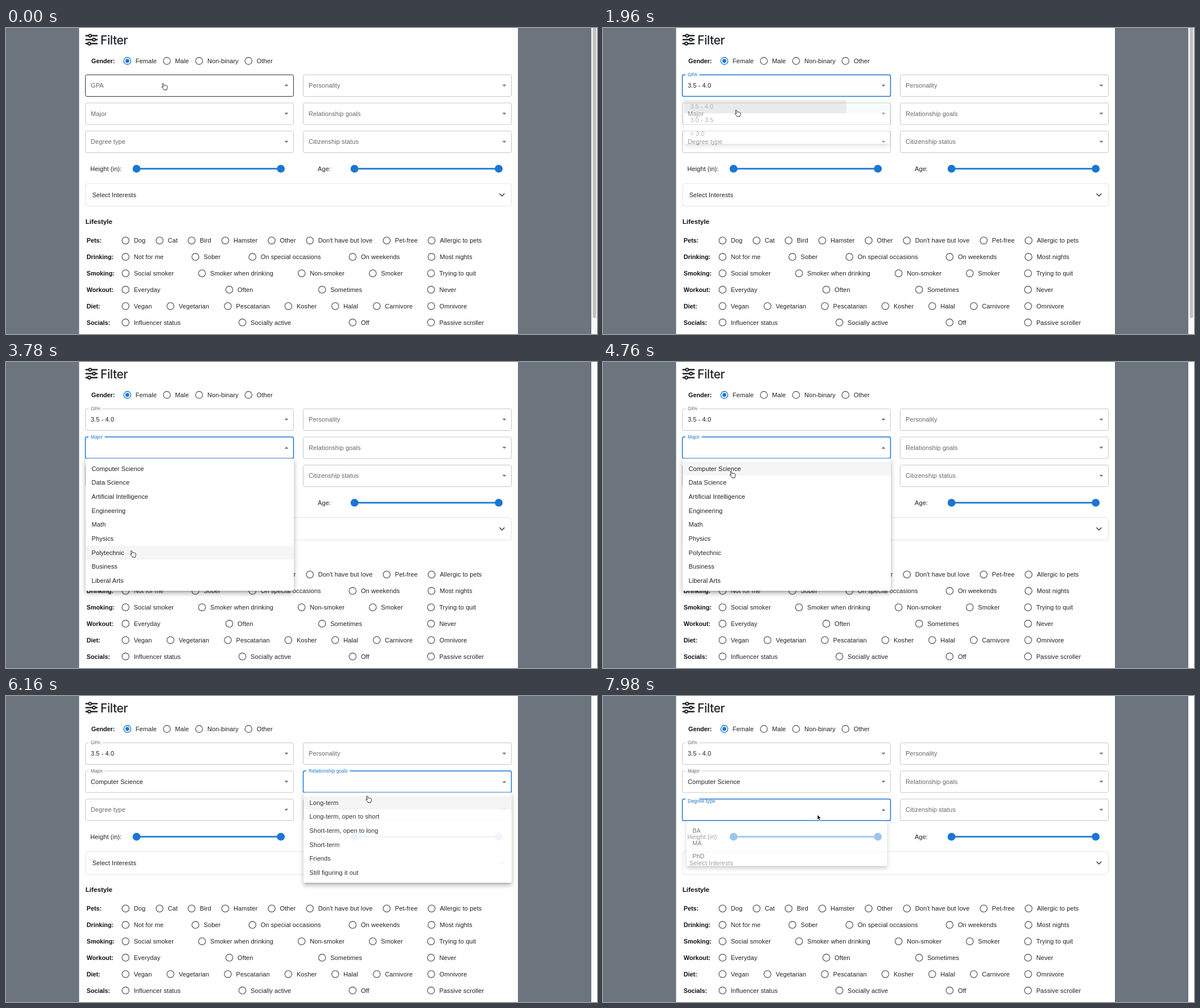
Recreate the animation shown at these times as an HTML page. Size 1039 px wide and 539 px high, loop 8 s.

```html
<!DOCTYPE html>
<html lang="en">
<head>
<meta charset="utf-8">
<title>Filter form</title>
<style>
  html, body { margin: 0; width: 100%; height: 100%; overflow: hidden; background: #fff; }
  #stage { position: relative; width: 1039px; height: 539px; overflow: hidden; }
  svg { position: absolute; left: 0; top: 0; }
  text, .menu { font: 11px "Liberation Sans", Arial, sans-serif; letter-spacing: .1px; fill: #212121; color: #212121; }
  .bold { font-weight: 700; font-size: 10.8px; letter-spacing: 0; fill: #111; }
  .head { font-size: 11.7px; }
  .title { font: 500 21px Inter, sans-serif; letter-spacing: -.45px; fill: #212529; }
  .menu {
    position: absolute; width: 366px; padding: 5.5px 0; border-radius: 2.75px;
    background: #fff; transform-origin: 50% 0;
    box-shadow: 0 3.4px 3.4px -2px rgba(0,0,0,.2), 0 5.5px 7px .7px rgba(0,0,0,.14), 0 2px 9.6px 1.4px rgba(0,0,0,.12);
  }
  .menu div { height: 24.7px; line-height: 24.7px; padding-left: 11px; }
</style>
</head>
<body>
<div id="stage">
  <svg id="page" width="1039" height="539">
    <path d="M0 0H128.5V539H0zM900 0H1029V539H900z" fill="#6c757d"/>
    <g id="bar">
      <rect x="1029" width="10" height="539" fill="#f8f8f8"/>
      <rect x="1031.5" y="-5" width="6" height="516" rx="3" fill="#c1c1c1"/>
    </g>
    <g id="icon" stroke="#212529" fill="#fff"></g>
  </svg>
  <svg id="top" width="1039" height="539">
    <g id="cursor">
      <path id="hand" fill="#fff" stroke="#111" stroke-width=".9" stroke-linejoin="round"
        d="M-1.2 .8C-1.5-.6 .4-1 .9 .3L2.2 3.6C2.6 2.7 3.9 2.7 4.2 3.5C4.7 2.9 5.8 3 6 3.9C6.7 3.4 7.6 3.9 7.6 4.8C7.8 7 7.6 8 6.9 9.4L6.7 11H1.8C1.4 9.6-.8 7.8-1.9 6.6C-2.5 5.7-1.4 4.8-.5 5.5L.5 6.2Z"/>
      <path id="arrow" fill="#000" stroke="#fff" stroke-width=".7" d="M0 0V9L2 7.2L3.5 10.6L5 10L3.5 6.7H6.3Z"/>
    </g>
  </svg>
</div>
<script>
const LOOP = 8000, STEP = 70, BLUE = '#1976d2', GREY = '#666666';
const W = 366, H = 38, ROW = 24.7, PAD = 5.5;
const $ = id => document.getElementById(id);
const page = $('page');

function add(tag, attrs, parent = page) {
  const el = document.createElementNS('http://www.w3.org/2000/svg', tag);
  set(el, attrs);
  parent.append(el);
  return el;
}
function set(el, attrs) {
  for (const k in attrs) el.setAttribute(k, attrs[k]);
}
function label(x, y, str, cls = '') {
  const el = add('text', { x, y, class: cls });
  el.textContent = str;
  return el;
}

// ---- easing ----
const clamp = v => Math.min(1, Math.max(0, v));
const mix = (a, b, p) => a + (b - a) * p;
const smooth = p => p * p * (3 - 2 * p);
// cubic-bezier(x1, 0, x2, 1)
const bezier = (x1, x2) => p => {
  p = clamp(p);
  let lo = 0, hi = 1, s = .5;
  for (let i = 0; i < 24; i++) {
    s = (lo + hi) / 2;
    const x = 3 * (1 - s) * s * ((1 - s) * x1 + s * x2) + s ** 3;
    if (x < p) lo = s; else hi = s;
  }
  return p <= 0 ? 0 : p >= 1 ? 1 : 3 * (1 - s) * s * s + s ** 3;
};
const easeInOut = bezier(.4, .2), easeOut = bezier(0, .2);

// ---- still parts ----
[[-2.5, -6.9], [4.3, 0], [-3.9, 6.9]].forEach(([dx, dy]) => {
  const y = 20.5 + dy;
  add('path', { d: `M140.7 ${y}H160`, 'stroke-width': 2.5, 'stroke-linecap': 'round' }, $('icon'));
  add('circle', { cx: 150.3 + dx, cy: y, r: 2.4, 'stroke-width': 2.06 }, $('icon'));
});
label(166, 28.5, 'Filter', 'title');

function radio(x, y, str, on) {
  const ink = on ? BLUE : '#666';
  add('circle', { cx: x, cy: y, r: 6.2, fill: 'none', stroke: ink, 'stroke-width': 1.37 });
  if (on) add('circle', { cx: x, cy: y, r: 3.4, fill: BLUE });
  label(x + 14.5, y + 4, str);
}
function radioRow(x, y, str, checked) {
  const [name, ...options] = str.split('|');
  label(x, y + 4, name, 'bold');
  options.forEach((o, i) => {
    const gap = o.indexOf(' ');
    radio(+o.slice(0, gap), y, o.slice(gap + 1), i === checked);
  });
}
radioRow(150, 58, 'Gender:|213.3 Female|282.8 Male|339.5 Non-binary|426.3 Other', 0);
label(139.7, 345, 'Lifestyle', 'bold head');
[
  "Pets:|210.2 Dog|270 Cat|326.3 Bird|385.5 Hamster|467 Other|534.2 Don't have but love|669.3 Pet-free|748.2 Allergic to pets",
  'Drinking:|210.2 Not for me|333 Sober|433.2 On special occasions|609.4 On weekends|748 Most nights',
  'Smoking:|210.2 Social smoker|344.6 Smoker when drinking|519.7 Non-smoker|644.8 Smoker|747.2 Trying to quit',
  'Workout:|210.2 Everyday|392.6 Often|555.7 Sometimes|747.2 Never',
  'Diet:|210.2 Vegan|289.2 Vegetarian|390 Pescatarian|496.4 Kosher|578.8 Halal|651.8 Carnivore|747.5 Omnivore',
  'Socials:|210.2 Influencer status|415.6 Socially active|609.4 Off|747.2 Passive scroller'
].forEach((row, i) => radioRow(141.7, 374.3 + i * 28.88, row));

function slider(x, name, from, to) {
  label(x, 251.8, name);
  add('path', { d: `M${from} 247.9H${to}`, stroke: BLUE, 'stroke-width': 2.75 });
  for (const cx of [from, to]) add('circle', { cx, cy: 247.9, r: 6.9, fill: BLUE });
}
slider(148.3, 'Height (in):', 229.5, 483.2);
slider(548, 'Age:', 612.7, 866.2);

add('rect', { x: 140, y: 274.2, width: 748.5, height: 39.8, rx: 4, fill: 'none', stroke: '#dee2e6' });
label(151.7, 298, 'Select Interests');
add('path', { d: 'M868 292L872 296L876 292', fill: 'none', stroke: '#212529', 'stroke-width': 1.3, 'stroke-linecap': 'round', 'stroke-linejoin': 'round' });

// ---- select fields ----
function field(col, row, name, opts = {}) {
  const x = 139.5 + col * 383, y = 82.5 + row * 49.5;
  const f = { x, y, focus: Infinity, blur: Infinity, pick: Infinity, ...opts };
  f.box = add('rect', { x, y, width: W, height: H, rx: 2.75, fill: 'none' });
  f.notch = add('rect', { x: x + 5.5, y: y - 1.2, height: 2.4, fill: '#fff' });
  f.name = label(0, 0, name);
  f.len = f.name.getComputedTextLength() * .75 + 7.5;
  f.text = label(x + 9.4, y + 22.6, f.value || '');
  f.tri = add('path', { d: 'M-3.5-1.7H3.5L0 1.8Z', fill: '#757575' });
  return f;
}
const gpa = field(0, 0, 'GPA', { focus: 300, blur: 2420, pick: 1853, value: '3.5 - 4.0' });
const major = field(0, 1, 'Major', { focus: 2420, blur: 5960, pick: 5160, value: 'Computer Science' });
const degree = field(0, 2, 'Degree type', { focus: 7884 });
const goals = field(1, 1, 'Relationship goals', { focus: 5960, blur: 7140 });
const fields = [gpa, major, degree, goals, field(1, 0, 'Personality'), field(1, 2, 'Citizenship status')];

function drawField(f, t, hover, open) {
  const focused = t >= f.focus && t <= f.blur;
  const filled = t >= f.pick;
  const back = filled ? 0 : easeOut((t - f.blur) / 200);
  const up = easeOut((t - f.focus) / 200) * (1 - back);
  const gap = clamp((t - f.focus - 50) / 100) * (filled ? 1 : 1 - clamp((t - f.blur + 14) / 50));
  const blue = 100 * easeOut((t - f.focus) / 200) * (1 - easeOut((t - f.blur) / 200));

  set(f.box, { stroke: focused ? BLUE : hover ? '#333' : '#c6c6c6', 'stroke-width': focused ? 1.5 : 1 });
  f.notch.setAttribute('width', f.len * gap);
  f.name.setAttribute('transform', `translate(${f.x + 9.5} ${f.y + mix(22.5, 2.6, up)}) scale(${mix(1, .75, up)})`);
  f.name.style.fill = `color-mix(in srgb, ${BLUE} ${blue}%, ${GREY})`;
  f.text.style.opacity = filled ? 1 : 0;
  f.tri.setAttribute('transform', `translate(${f.x + 353.5} ${f.y + 19}) rotate(${open ? 180 : 0})`);
}

// ---- menus ----
function menu(f, close, items, press = Infinity) {
  const el = document.createElement('div');
  el.className = 'menu';
  el.style.left = f.x + 'px';
  el.style.top = f.y + H + 'px';
  for (const item of items.split('|')) {
    const row = document.createElement('div');
    row.textContent = item;
    el.append(row);
  }
  $('stage').insertBefore(el, $('top'));
  const n = el.children.length, k = (n * 36 + 16) / 36;
  return { f, el, n, open: f.focus, close, press, dur: (4 + 15 * k ** .25 + k / 5) * 10 };
}
const menus = [
  menu(gpa, 1853, '3.5 - 4.0|3.0 - 3.5|< 3.0', 1730),
  menu(major, 5160, 'Computer Science|Data Science|Artificial Intelligence|Engineering|Math|Physics|Polytechnic|Business|Liberal Arts', 5040),
  menu(goals, 7100, 'Long-term|Long-term, open to short|Short-term, open to long|Short-term|Friends|Still figuring it out'),
  menu(degree, Infinity, 'BA|MA|PhD')
];

function drawMenu(m, t, x, y) {
  const { el, dur } = m;
  const shown = t >= m.open && t < m.close + dur;
  el.style.display = shown ? '' : 'none';
  if (!shown) return;
  const closing = t >= m.close, age = t - (closing ? m.close : m.open);
  const fade = easeInOut(age / dur);
  const grow = easeInOut((age - (closing ? dur / 3 : 0)) / (dur * .666));
  const size = closing ? 1 - grow : grow;
  el.style.opacity = closing ? 1 - fade : fade;
  el.style.transform = `scale(${mix(.75, 1, size)}, ${mix(.5625, 1, size)})`;

  const hover = inMenu(m, x, y) ? Math.floor((y - m.f.y - H - PAD) / ROW) : -1;
  [...el.children].forEach((row, i) => {
    const tint = i === 0 && closing && t >= m.f.pick ? 'rgba(25,118,210,.08)' : i === hover ? 'rgba(0,0,0,.04)' : 'transparent';
    row.style.background = tint;
    if (i === 0 && t >= m.press) {
      const r = 300 * easeInOut((t - m.press) / 550);
      row.style.background = `radial-gradient(circle at ${x - m.f.x}px 20px, rgba(0,0,0,.2) ${r}px, transparent ${r + 1}px) ${tint}`;
    }
  });
}

const inside = (f, x, y, top, h) => x >= f.x && x <= f.x + W && y >= top && y <= top + h;
const inMenu = (m, x, y) => inside(m.f, x, y, m.f.y + H, m.n * ROW + 2 * PAD);
const inField = (f, x, y) => inside(f, x, y, f.y, H);

// ---- pointer path: time, x, y ----
const path = [
  [0, 276, 98], [350, 276, 98], [840, 262, 133], [1190, 225, 171], [1400, 191, 155], [1540, 234, 145],
  [2420, 234, 145], [2800, 240, 182], [3290, 235, 218], [3850, 220, 338], [4130, 222, 308],
  [4760, 225, 193], [4970, 229, 176], [5250, 229, 176], [5670, 626, 154], [5960, 626, 154],
  [6300, 640, 190], [6580, 625, 200], [6720, 625, 200], [7140, 335, 195], [7490, 372, 206],
  [7560, 372, 206], [7980, 377, 209], [LOOP, 377, 209]
];
function pointer(t) {
  const i = path.findIndex(p => p[0] > t);
  const [t0, x0, y0] = path[i - 1], [t1, x1, y1] = path[i];
  const p = smooth((t - t0) / (t1 - t0));
  return [mix(x0, x1, p), mix(y0, y1, p)];
}

function draw() {
  const now = performance.now() % LOOP, t = now - now % STEP;
  const [x, y] = pointer(t);
  const live = menus.find(m => t >= m.open && t < m.close + m.dur);
  const locked = live && t < live.close;
  for (const f of fields) drawField(f, t, !live && inField(f, x, y), locked && live.f === f);
  for (const m of menus) drawMenu(m, t, x, y);
  $('bar').style.display = locked ? 'none' : '';

  const hand = live ? inMenu(live, x, y) : fields.some(f => inField(f, x, y));
  $('hand').style.display = hand ? '' : 'none';
  $('arrow').style.display = hand ? 'none' : '';
  $('cursor').setAttribute('transform', `translate(${x} ${y})`);
  requestAnimationFrame(draw);
}
draw();
</script>
</body>
</html>
```
